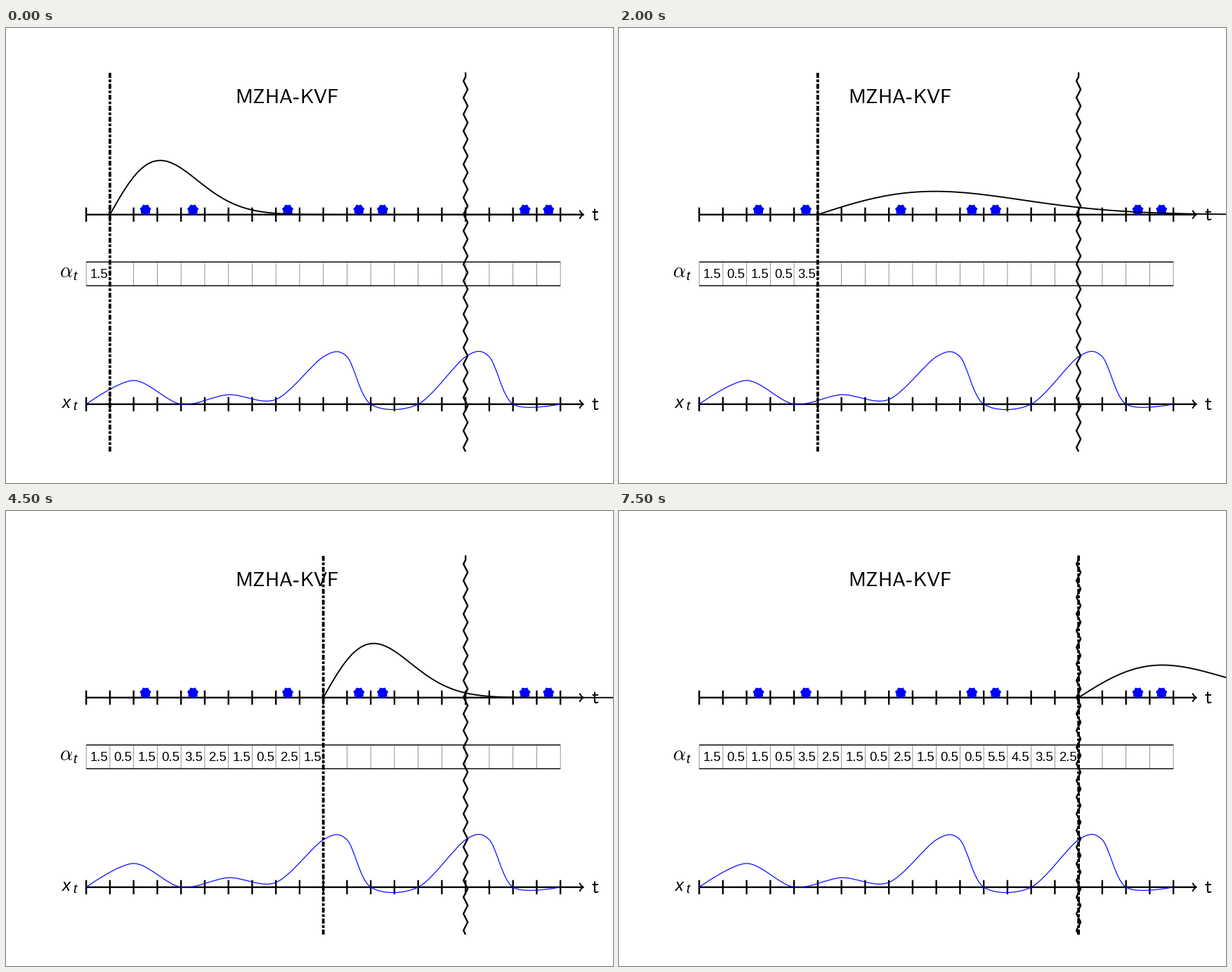
A matplotlib script that plays this animation: 864x648 px, repeating every 8 s.

```python
import numpy as np
import matplotlib.pyplot as plt
from matplotlib.animation import FuncAnimation
from matplotlib.patches import PathPatch, Polygon
from matplotlib.path import Path

W, H, DPI = 864, 648, 100
UNIT = 33.75            # one time step in pixels
PT = 2.372              # one drawing point in pixels
X0, TOP = 114.15, 265.75
BOTTOM = TOP + 8 * UNIT
STEPS, FRAMES = 20, 16
EVENTS = [2.5, 4.5, 8.5, 11.5, 12.5, 18.5, 19.5]

plt.rcParams.update({"font.family": "Liberation Sans", "mathtext.fontset": "cm",
                     "path.snap": False})
fig = plt.figure(figsize=(W / DPI, H / DPI), dpi=DPI, facecolor="white")
ax = fig.add_axes([0, 0, 1, 1])
ax.set(xlim=(0, W), ylim=(H, 0))
ax.axis("off")


def px(size):
    return size * 72 / DPI


def at(t):
    return X0 + UNIT * t


def wait(now):
    """Time left until the next event."""
    return min(e - now for e in EVENTS if e > now)


def line(xs, ys, width, color="black", **kw):
    kw.setdefault("solid_capstyle", "butt")
    return ax.plot(xs, ys, color=color, lw=px(width * PT), **kw)[0]


def label(x, y, s, size, **kw):
    return ax.text(x, y, s, fontsize=px(size), va="baseline", **kw)


def sans(s):
    return rf"$\mathsf{{{s}}}$"


def bezier(points, width, color):
    codes = [Path.MOVETO] + [Path.CURVE4] * (len(points) - 1)
    ax.add_patch(PathPatch(Path(points, codes), fill=False, ec=color,
                           lw=px(width * PT), capstyle="round",
                           joinstyle="round", zorder=2))


def time_axis(y):
    tip = at(STEPS + 1) - 2
    line([X0, tip], [y, y], 1)
    for k in range(STEPS + 1):
        line([at(k)] * 2, [y - .3 * UNIT, y + .3 * UNIT], 1)
    d = .58 * PT
    barb = [(-3, 4), (-2.75, 2.5), (0, .25), (.75, 0)]
    mirrored = [(u, -v) for u, v in barb[-2::-1]]
    bezier([(tip + d * u, y + d * v) for u, v in barb + mirrored], .8, "black")
    label(833, y + 8, sans("t"), 28.5)


def smooth_curve(points, pull=.2775 * .55):
    p = np.array(points, float)
    support = np.zeros_like(p)
    support[1:-1] = pull * (p[2:] - p[:-2])
    path = [p[0]]
    for k in range(len(p) - 1):
        path += [p[k] + support[k], p[k + 1] - support[k + 1], p[k + 1]]
    bezier([(at(x), BOTTOM - UNIT * y) for x, y in path], .5, "blue")


def star(t, tips=7, size=8.3):
    k = np.arange(2 * tips)
    angle = np.pi / 2 + k * np.pi / tips
    radius = size * np.where(k % 2, .8, 1)
    ax.add_patch(Polygon(np.c_[at(t) + radius * np.cos(angle),
                               TOP - .2 * UNIT + radius * np.sin(angle)],
                         fc="blue", lw=0, zorder=3))


def zigzag(x, y_top, y_bottom, amplitude=3, half=5 * PT):
    n = int((y_bottom - y_top) / half)
    k = np.arange(n)
    xs = x + amplitude * np.where(k % 2, 1, -1)
    ys = y_bottom - half * (k + .5)
    line([x, *xs, x, x], [y_bottom, *ys, y_bottom - half * n, y_top], 1,
         solid_joinstyle="miter", zorder=4)


# Row of parameter cells
row = TOP + 2 * UNIT, TOP + 3 * UNIT
for k in range(STEPS + 1):
    line([at(k)] * 2, row, .35, "gray", zorder=1)
for y in row:
    line([X0, at(STEPS)], [y, y], .6)

time_axis(TOP)
time_axis(BOTTOM)

# Input signal: two small waves, then the same bump twice
signal = [(0, 0), (2, 1), (4, 0), (6, .4), (8, .2)]
for s in (10, 16):
    signal += [(s, 2), (s + 1, 2), (s + 2, 0), (s + 4, 0)]
smooth_curve(signal)

for t in EVENTS:
    star(t)
span = TOP - 6 * UNIT, BOTTOM + 2 * UNIT
zigzag(at(FRAMES), *span)

# Title and row labels
label(326, 107, sans("MZHA"), 28.5)
line([409, 416.5], [100.3, 100.3], .95)
label(418.5, 107, sans("KVF"), 28.5)
label(76, 355, r"$\alpha$", 28.5)
label(80, 541, "x", 24, style="italic")
for y in (359, 544):
    label(95, y, "t", 19, style="italic")

values = [label(at(k + .5) + 1.6, 356.5, f"{wait(k + 1):.1f}", 18.7, ha="center")
          for k in range(FRAMES)]
density = line([], [], .8, zorder=3.5, solid_joinstyle="round")
marker = line([], [], 1.6, zorder=5, linestyle=(0, (1.875, .625, 1, .625)))
ahead = np.linspace(0, 20, 101)


def update(i):
    now = i + 1
    scale = 2 * wait(now)
    pdf = 2 * ahead / scale**2 * np.exp(-(ahead / scale)**2)
    density.set_data(at(now + ahead), TOP - 8 * UNIT * pdf)
    marker.set_data([at(now)] * 2, span[::-1])
    for k, text in enumerate(values):
        text.set_visible(k < now)
    return [density, marker, *values]


anim = FuncAnimation(fig, update, frames=FRAMES, interval=500,
                     repeat=True, repeat_delay=0, blit=False)
plt.show()
```
